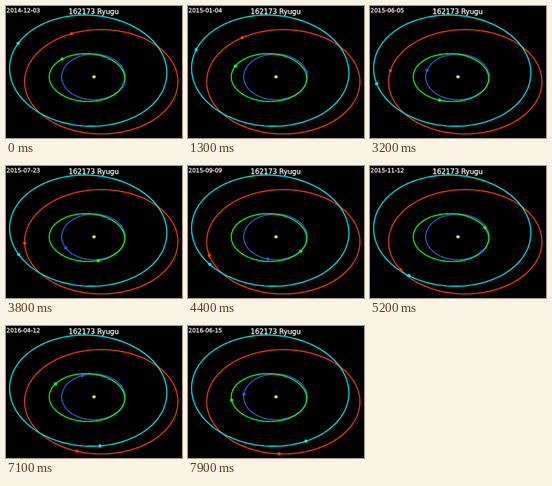
Animation, 220 px wide and 165 px high, one loop 8000 ms. Source, as an HTML page:

```html
<!DOCTYPE html>
<html lang="en">
<head>
<meta charset="utf-8">
<title>Orbit of 162173 Ryugu</title>
<style>
  html, body { margin: 0; width: 100%; height: 100%; overflow: hidden; background: #000; }
  svg { display: block; width: 100%; height: 100%; }
  text { fill: #fff; stroke: #fff; stroke-width: 0.25px; font-family: "DejaVu Sans", sans-serif; }
</style>
</head>
<body>
<svg id="stage" viewBox="0 0 220 165">
  <rect width="220" height="165" fill="#000"/>
  <g id="paths" fill="none" stroke-width="1.4"></g>
  <circle cx="110" cy="88.5" r="2.1" fill="#ffee10"/>
  <g id="bodies"></g>
  <text id="date" x="0.6" y="7.9" font-size="7.25"></text>
  <text x="109.7" y="9.6" font-size="8.65" text-anchor="middle">162173 Ryugu</text>
</svg>
<script>
const LOOP = 8000, STEP = 100, HOLD = 9, DAYS_PER_STEP = 8;
const START = Date.UTC(2014, 11, 3), DAY = 864e5;
const SUN = { x: 110, y: 88.5 };
const RAD = Math.PI / 180;

// Projected ellipses: centre, radii, skew, mean anomaly at start (deg), mean motion (deg/day)
const orbits = [
  { color: "#2b58d4", cx: 109.35, cy: 88.6, rx: 39.7, ry: 28.5, skew: 0, m0: -31, n: 0.9856 },
  { color: "#18f018", cx: 101.26, cy: 89.5, rx: 47.17, ry: 29.9, skew: -0.0305, m0: 110, n: 0.7597 },
  { color: "#f03c08", cx: 119.1, cy: 94.7, rx: 95.8, ry: 65.2, skew: 0, m0: -19.3, n: 0.26 },
  { color: "#00e4ee", cx: 102.8, cy: 80.8, rx: 98.3, ry: 69.5, skew: -0.041, m0: -147.6, n: 0.2525 }
];

const $ = id => document.getElementById(id);

function add(parent, tag, attrs) {
  const el = document.createElementNS("http://www.w3.org/2000/svg", tag);
  for (const key in attrs) el.setAttribute(key, attrs[key]);
  return parent.appendChild(el);
}

function pointAt(o, angle) {
  const c = Math.cos(angle), s = Math.sin(angle);
  const v = s * Math.sqrt(1 - o.skew * o.skew) + c * o.skew;
  return [o.cx + o.rx * c, o.cy - o.ry * v];
}

function outline(o) {
  const pts = [];
  for (let i = 0; i < 180; i++) {
    pts.push(pointAt(o, i * 2 * RAD).map(v => v.toFixed(2)).join(" "));
  }
  return "M" + pts.join("L") + "Z";
}

// Kepler's equation
function eccentricAnomaly(m, e) {
  let E = m;
  for (let i = 0; i < 8; i++) E -= (E - e * Math.sin(E) - m) / (1 - e * Math.cos(E));
  return E;
}

for (const o of orbits) {
  // The Sun's offset from the centre gives eccentricity and perihelion
  const u = (SUN.x - o.cx) / o.rx;
  const v = ((o.cy - SUN.y) / o.ry - u * o.skew) / Math.sqrt(1 - o.skew * o.skew);
  o.e = Math.hypot(u, v);
  o.peri = Math.atan2(v, u);
  add($("paths"), "path", { d: outline(o), stroke: o.color });
  o.dot = add($("bodies"), "circle", { r: 2.1, fill: o.color });
}

function draw(time) {
  const days = Math.max(0, Math.floor(time / STEP) - HOLD) * DAYS_PER_STEP;
  $("date").textContent = new Date(START + days * DAY).toISOString().slice(0, 10);
  for (const o of orbits) {
    const E = eccentricAnomaly((o.m0 + o.n * days) * RAD, o.e);
    const [x, y] = pointAt(o, o.peri + E);
    o.dot.setAttribute("cx", x.toFixed(2));
    o.dot.setAttribute("cy", y.toFixed(2));
  }
}

const begin = performance.now();
function tick() {
  draw((performance.now() - begin) % LOOP);
  requestAnimationFrame(tick);
}
tick();
</script>
</body>
</html>
```
